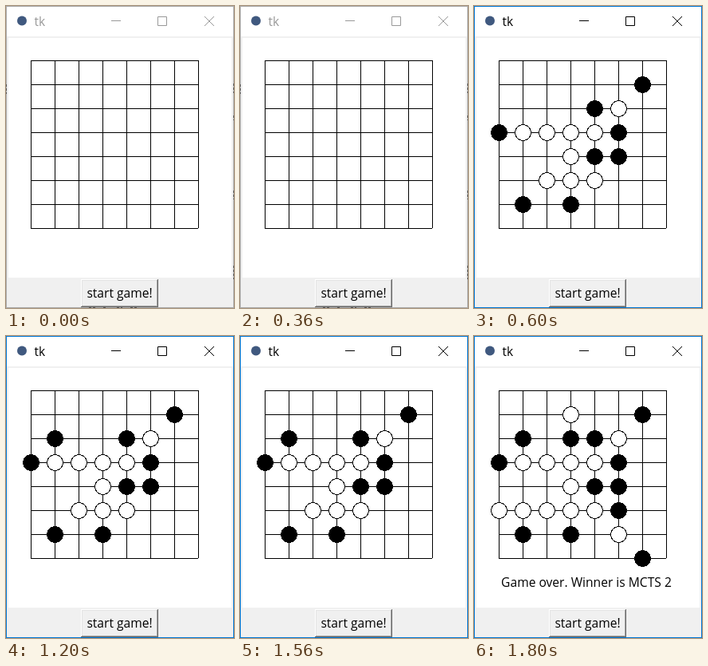
Animation of 286x378 px, one loop 2400 ms. Source, as an HTML page:

```html
<!DOCTYPE html>
<html lang="en">
<head>
<meta charset="utf-8">
<style>
html, body { margin: 0; width: 100%; height: 100%; overflow: hidden; background: #fff; }
svg { display: block; }
text { font: 15.6px "Open Sans", "Noto Sans", sans-serif; }
.crisp { shape-rendering: crispEdges; }
</style>
</head>
<body>
<svg width="286" height="378" viewBox="0 0 286 378">
  <rect width="286" height="378" fill="#fff"/>
  <g class="crisp">
    <path d="M1 38H285V377H1ZM3 40V340H283V40Z" fill="#f0f0f0" fill-rule="evenodd"/>
    <rect id="border" x=".5" y=".5" width="285" height="377" fill="none"/>
    <path id="backdrop" d="M285.5 97v12m0 28v6m0 88v11m0 83v17M104 377.5h10m8 0h5m12 0h7m10 0h8M0.5 98v12" stroke="#555" stroke-dasharray="3 2"/>
  </g>

  <circle cx="20" cy="18.5" r="6" fill="#40597f"/>
  <g id="title">
    <text x="35.5" y="25">tk</text>
    <path d="M132 18.5h12M190.5 13.5h11v11h-11zM249 13l12 12m0-12l-12 12" fill="none" stroke="currentColor"/>
  </g>

  <path id="grid" class="crisp" stroke="#000"/>
  <g id="pieces" class="crisp" stroke="#000"></g>
  <text id="result" x="141" y="314" text-anchor="middle">Game over. Winner is MCTS 2</text>

  <g class="crisp" fill="none">
    <path d="M94.5 377V342.5H190" stroke="#fff"/>
    <path d="M95.5 375V343.5H189" stroke="#e3e3e3"/>
    <path d="M95 375.5H189.5V343" stroke="#a0a0a0"/>
    <path d="M94 376.5H190.5V342" stroke="#696969"/>
  </g>
  <text x="142.5" y="365" text-anchor="middle">start game!</text>
</svg>
<script>
const STEP = 600, CELL = 30, LEFT = 31.5, TOP = 68.5, SIZE = 7 * CELL;
const $ = id => document.getElementById(id);

// Each stone is a column and row digit, grouped by the step it appears in.
const moves = [
  { step: 1, black: "61 42 03 53 44 54 16 36", white: "52 13 23 33 43 34 25 35 45" },
  { step: 2, black: "12", white: "" },
  { step: 3, black: "32 55 67", white: "31 05 15 56" }
];

let lines = "";
for (let i = 0; i < 8; i++) {
  const d = i * CELL;
  lines += `M${LEFT - .5} ${TOP + d}h${SIZE}M${LEFT + d} ${TOP - .5}v${SIZE}`;
}
$("grid").setAttribute("d", lines);

const stones = (cells, fill) => cells.split(" ").filter(Boolean).map(([col, row]) =>
  `<circle cx="${LEFT + col * CELL}" cy="${TOP + row * CELL}" r="10" fill="${fill}"/>`).join("");

$("pieces").innerHTML = moves.map(({ black, white }) =>
  `<g>${stones(black, "#000")}${stones(white, "#fff")}</g>`).join("");

const show = (el, on) => { el.style.display = on ? "" : "none"; };

function draw(time) {
  const step = Math.floor(time / STEP) % 4;
  const active = step > 0;
  const ink = active ? "#000" : "#999";
  $("border").setAttribute("stroke", active ? "#0078d7" : "#aaa");
  $("title").style.color = ink;
  $("title").style.fill = ink;
  show($("backdrop"), !active);
  moves.forEach((move, i) => show($("pieces").children[i], step >= move.step));
  show($("result"), step === 3);
}

const start = performance.now();
function tick() {
  draw(performance.now() - start);
  requestAnimationFrame(tick);
}
tick();
</script>
</body>
</html>
```
